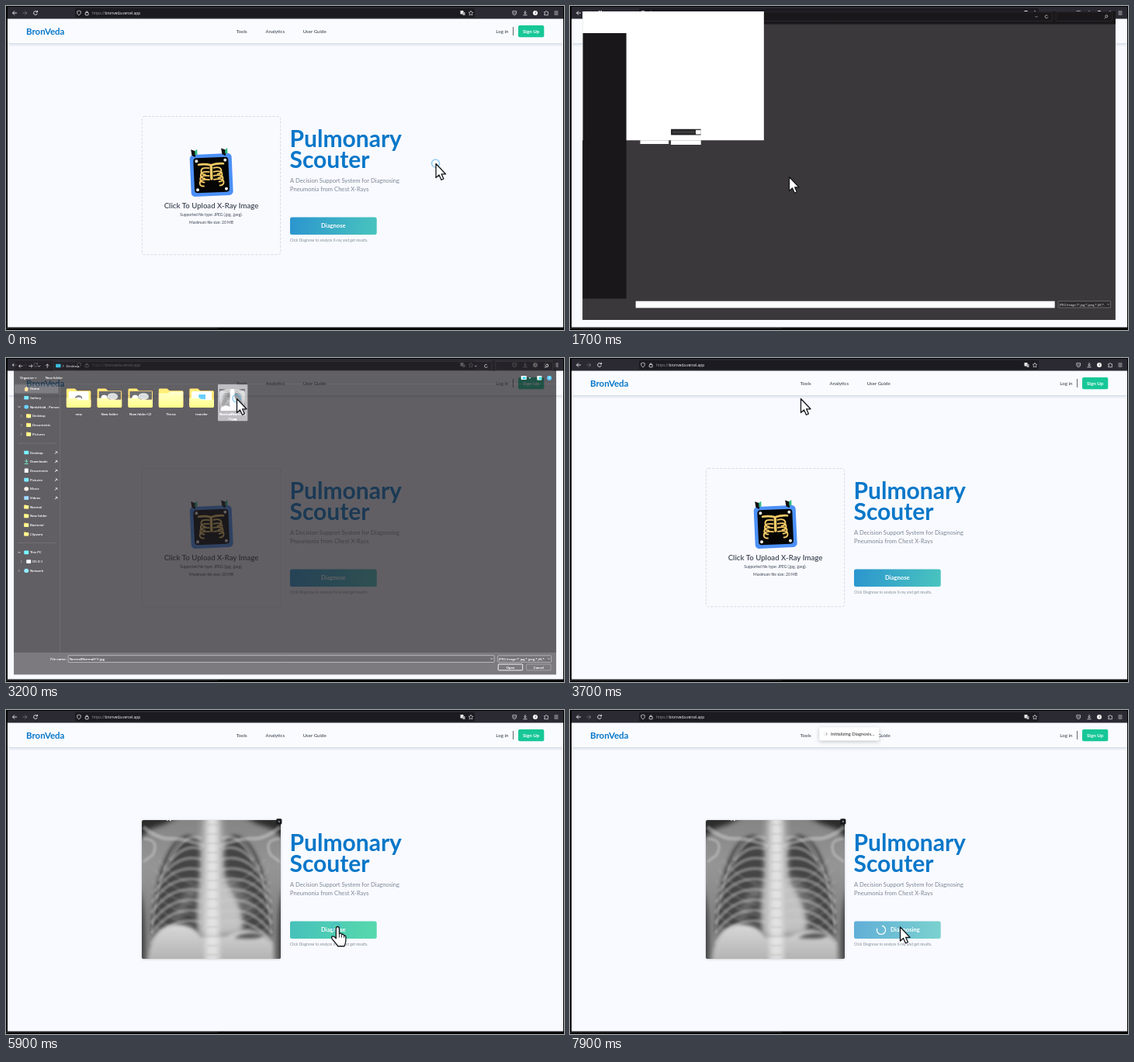
Recreate the animation shown at these times as an HTML page with a canvas. Size 719 by 418 pixels, loop 8 s.

```html
<!DOCTYPE html>
<html lang="en">
<head>
<meta charset="utf-8">
<title>Chest X-ray upload</title>
<style>
html, body { margin: 0; width: 100%; height: 100%; overflow: hidden; background: #000; }
canvas { display: block; width: 719px; height: 418px; }
</style>
</head>
<body>
<canvas id="stage" width="719" height="418"></canvas>
<script>
const LOOP = 8000, STEP = 100;
const PAGE_FONT = 'Lato, sans-serif', UI_FONT = '"Open Sans", "Noto Sans", sans-serif';
const stage = document.getElementById('stage').getContext('2d');
const layer = newCanvas(719, 418);
let ctx = stage;

const clamp = v => Math.min(1, Math.max(0, v));
const progress = (t, from, to) => clamp((t - from) / (to - from));
const ease = p => p * p * (3 - 2 * p);

function newCanvas(width, height) {
  return Object.assign(document.createElement('canvas'), { width, height }).getContext('2d');
}
function drawOn(target, draw) {
  const previous = ctx;
  ctx = target;
  draw();
  ctx = previous;
}
function rect(x, y, w, h, fill, radius = 0, stroke, lineWidth = 0.6) {
  ctx.beginPath();
  ctx.roundRect(x, y, w, h, radius);
  if (fill) { ctx.fillStyle = fill; ctx.fill(); }
  if (stroke) { ctx.strokeStyle = stroke; ctx.lineWidth = lineWidth; ctx.stroke(); }
}
function path(d, fill, stroke, lineWidth = 1) {
  const p = new Path2D(d);
  if (fill) { ctx.fillStyle = fill; ctx.fill(p); }
  if (stroke) { ctx.strokeStyle = stroke; ctx.lineWidth = lineWidth; ctx.stroke(p); }
}
function ellipse(x, y, rx, ry, fill) {
  ctx.beginPath();
  ctx.ellipse(x, y, rx, ry, 0, 0, Math.PI * 2);
  ctx.fillStyle = fill;
  ctx.fill();
}
function arc(x, y, r, from, to, stroke, lineWidth) {
  ctx.beginPath();
  ctx.arc(x, y, r, from, to);
  ctx.strokeStyle = stroke;
  ctx.lineWidth = lineWidth;
  ctx.stroke();
}
function text(s, x, y, size, color, { weight = 400, align = 'left', font = PAGE_FONT } = {}) {
  ctx.font = `${weight} ${size}px ${font}`;
  ctx.textAlign = align;
  ctx.fillStyle = color;
  ctx.fillText(s, x, y);
}
const uiText = (s, x, y, color = '#f2f2f2', align = 'left', size = 4.4) =>
  text(s, x, y, size, color, { align, font: UI_FONT });
function at(x, y, draw, sx = 1, sy = sx) {
  ctx.save();
  ctx.translate(x, y);
  ctx.scale(sx, sy);
  draw();
  ctx.restore();
}
function gradient(x0, y0, x1, y1, ...colors) {
  const g = ctx.createLinearGradient(x0, y0, x1, y1);
  colors.forEach((c, i) => g.addColorStop(i / (colors.length - 1), c));
  return g;
}
function withShadow(color, blur, dy, draw) {
  ctx.save();
  ctx.shadowColor = color;
  ctx.shadowBlur = blur;
  ctx.shadowOffsetY = dy;
  draw();
  ctx.restore();
}

// Soft-toned chest picture, painted once and reused for the preview and thumbnail
function paintXray() {
  rect(0, 0, 179, 179, gradient(0, 0, 0, 179, '#858585', '#959595', '#858585', '#8a8a8a'));
  ctx.filter = 'blur(3px)';
  path('M-5-5H48L30 5 10 12-5 26ZM184-5H131L149 5 169 12 184 26Z', '#2c2c2c');
  path('M-5 85Q6 110 4 184H-5ZM184 85Q173 110 175 184H184Z', '#404040');
  ctx.filter = 'blur(2.5px)';
  path('M54 21C31 28 13 85 12 148Q20 138 40 135 62 133 74 146C69 110 79 65 75 31Q65 15 54 21Z' +
       'M126 21C149 28 166 85 168 150Q152 138 128 142C134 118 112 92 108 76C103 53 105 36 108 28Q117 15 126 21Z', '#454545');
  ctx.filter = 'blur(1px)';
  for (const side of [-1, 1]) {
    at(90, 0, () => {
      for (let i = 0; i < 9; i++) {
        const y = 24 + i * 13.5, reach = 44 + 34 * Math.sin(Math.min(1.5, 0.3 + i * 0.25));
        path(`M12 ${y}Q${reach * 0.65} ${y - 10} ${reach} ${y + 28}`, null, 'rgba(205,205,205,.38)', 4.5);
        if (i > 1) path(`M${reach} ${y}Q${reach * 0.7} ${y + 25} 24 ${y + 31}`, null, 'rgba(200,200,200,.13)', 4);
      }
      path('M9 34Q35 23 52 24T88 9', null, 'rgba(220,220,220,.4)', 5);
      path('M88 24Q66 25 76 45L88 54', null, 'rgba(220,220,220,.35)', 4);
      path('M37 23Q66 45 77 145', null, 'rgba(225,225,225,.3)', 2);
    }, side, 1);
  }
  ctx.filter = 'blur(5px)';
  path('M79-5H102L105 75Q136 112 129 146L74 150Q69 105 77 75Z', 'rgba(205,205,205,.85)');
  path('M70 85Q55 100 45 130M110 75Q128 90 140 120', null, 'rgba(190,190,190,.4)', 9);
  ctx.filter = 'blur(2px)';
  path('M10 168Q18 138 42 135 66 135 76 151L108 150Q143 132 169 160V184H8Z',
    gradient(0, 135, 0, 179, '#d8d8d8', '#b4b4b4'));
  path('M119 152Q138 141 157 149Q151 155 119 152Z', '#555');
  ctx.filter = 'blur(3px)';
  path('M85-5H97L100 184H82Z', 'rgba(240,240,240,.7)');
  ctx.filter = 'blur(1px)';
  for (let y = 5; y < 175; y += 12) rect(84, y, 14, 2, 'rgba(150,150,150,.25)');
}
const xray = newCanvas(179, 179);
drawOn(xray, paintXray);

function browserBar() {
  rect(2, 1, 716, 15.5, '#2b2a33');
  rect(89, 3, 515, 12, '#1c1b22', 2);
  const ink = '#eee';
  path('M14 9H8.5M11 6.5L8.5 9 11 11.5', null, ink, 0.9);
  path('M21.5 9H27M24.5 6.5L27 9 24.5 11.5', null, '#777', 0.8);
  arc(38, 9, 2.4, 0.3, 5.5, ink, 0.9);
  path('M38.3 8.2H41V5.5Z', ink);
  path('M94 6L96.5 7Q96.5 11 94 12 91.5 11 91.5 7Z', null, ink, 0.7);
  rect(102.2, 8.5, 4, 3.3, null, 0.6, ink, 0.8);
  arc(104.2, 8.3, 1.3, Math.PI, 0, ink, 0.8);
  uiText('https://', 111, 11, '#98979f', 'left', 4.8);
  uiText('bronveda.vercel.app', 127.5, 11, '#fbfbfe', 'left', 4.8);
  rect(585.5, 6, 4, 4.5, ink, 0.5);
  rect(588.5, 8, 3, 4, '#aaa', 0.5);
  path('M599 6L599.9 8.1 602 8.3 600.4 9.8 600.9 12 599 10.8 597.1 12 597.6 9.8 596 8.3 598.1 8.1Z', null, ink, 0.6);
  path('M652.8 6.7H657.6V9Q657 11.7 655.2 11.7 653.4 11.7 652.8 9ZM654 8.4L655.2 9.6 656.4 8.4', null, ink, 0.7);
  path('M669 6V10M667.3 8.5L669 10.2 670.7 8.5M666.5 11.7H671.5', null, ink, 0.8);
  ellipse(682, 9, 3, 3, '#fff');
  path('M682.7 7V9.5H681.4', null, '#333', 0.6);
  path('M693.7 7.7H695Q696 5 697 7.7H698.4V11.7H693.7V10.4Q696 9.8 693.7 9Z', null, ink, 0.7);
  path('M706.5 7H711.5M706.5 9H711.5M706.5 11H711.5', null, ink, 0.7);
}

function ribcageIcon() {
  at(264.7, 218, () => {
    ctx.rotate(-0.045);
    ctx.lineCap = ctx.lineJoin = 'round';
    rect(-27, -27, 54, 54, '#4c90f7', 5);
    for (const x of [-21, 18]) {
      path(`M${x - 4}-34L${x + 3}-31 ${x + 1}-24 ${x - 3}-26Z`, '#101010');
      path(`M${x + 1}-32L${x + 4}-34V-27H${x + 1}Z`, '#2dbb83');
    }
    rect(-22.5, -22.5, 45, 45, '#050505', 4);
    for (const x of [-1, 1]) for (const y of [-1, 1]) ellipse(x * 18.5, y * 18.5, 2, 2, '#f1f1e8');
    const bone = '#f6cb66';
    path('M0-12V5', null, bone, 3.4);
    for (const side of [-1, 1]) at(0, 0, () => {
      path('M1-13Q8-15 16-14', null, bone, 2.6);
      for (let i = 0; i < 4; i++) {
        const y = -9 + i * 5, w = 13 + i * 0.8;
        path(`M3 ${y}Q${w} ${y - 2} ${w} ${y + 4}Q${w} ${y + 8} ${w - 5} ${y + 8}`, null, bone, 1.9);
      }
    }, side, 1);
  });
}

function uploadBox() {
  ctx.setLineDash([3, 2]);
  rect(175.4, 142.4, 178.2, 178.4, '#f9fafe', 3, '#cbd2dc', 0.8);
  ctx.setLineDash([]);
  ribcageIcon();
  const centered = { align: 'center', weight: 500 };
  text('Click To Upload X-Ray Image', 264.5, 261, 9.6, '#414956', { align: 'center', weight: 600 });
  text('Supported file type: JPEG (.jpg, .jpeg).', 264.5, 271.3, 4.9, '#4b5360', centered);
  text('Maximum file size: 20 MB', 264.5, 280.5, 5, '#4b5360', centered);
}

function preview() {
  withShadow('rgba(0,0,0,.2)', 3, 0.5, () => rect(175, 142, 179, 179, '#777', 2.5));
  ctx.save();
  ctx.beginPath();
  ctx.roundRect(175, 142, 179, 179, 2.5);
  ctx.clip();
  ctx.drawImage(xray.canvas, 175, 142);
  ctx.restore();
  rect(207, 141.5, 2, 1, '#fff');
  rect(211, 141.5, 1.5, 1.5, '#fff');
  rect(348.2, 140.3, 7.2, 7.2, '#16181c', 1.5);
  path('M350.6 142.7L353 145.1M353 142.7L350.6 145.1', null, '#bbb', 0.7);
}

function diagnoseButton(t, hover, busy) {
  const colors = busy ? ['#61aed7', '#7bd2cf'] : hover ? ['#46c1bb', '#56d9ac'] : ['#2b95cf', '#49c4be'];
  rect(366, 272.5, 111.7, 22.5, gradient(366, 272, 477, 295, ...colors), 2.5);
  const label = { weight: 700 };
  if (busy) {
    const a = t / 1000 * Math.PI * 2 - 0.77;
    arc(401, 283.8, 5.6, a, a + 4.9, '#fff', 1.3);
    text('Diagnosing', 413, 286.4, 7.6, '#fff', label);
  } else text('Diagnose', 406, 286.4, 7.6, '#fff', label);
}

function toast(t) {
  const p = ease(progress(t, 5900, 6200));
  if (!p) return;
  ctx.save();
  ctx.globalAlpha = p;
  at(359.7, 30.8, () => {
    withShadow('rgba(0,0,0,.22)', 5, 1.5, () => rect(-38.5, -8.6, 77, 17.2, '#fff', 2));
    arc(-30.7, 0, 2, 0, Math.PI * 2, '#e3e3e3', 0.7);
    const a = t / 1000 * Math.PI * 2;
    arc(-30.7, 0, 2, a, a + 1.6, '#666', 0.7);
    text('Initializing Diagnosis...', -23.7, 2, 5.8, '#363636', { weight: 500 });
  }, 0.85 + 0.15 * p);
  ctx.restore();
}

function page(t, hover) {
  rect(0, 0, 719, 418, '#000');
  rect(2, 16, 716, 398.5, '#f8faff');
  rect(0, 415.3, 273, 1, '#3b3b3b');
  rect(273, 415.3, 444, 1, '#1d1d1f');
  withShadow('rgba(40,60,90,.25)', 4, 1, () => rect(2, 16, 716, 32, '#f9fbff'));
  browserBar();
  text('BronVeda', 26, 37, 11.5, '#0877c9', { weight: 700 });
  for (const [s, x] of [['Tools', 296.7], ['Analytics', 334.6], ['User Guide', 382.7], ['Log in', 631.3]])
    text(s, x, 35.1, 6.1, '#3f4753', { weight: 500 });
  rect(653, 27, 0.8, 11, '#444');
  rect(660, 25, 33.3, 15.3, '#17c797', 2);
  text('Sign Up', 676.6, 35, 6.2, '#fff', { weight: 700, align: 'center' });

  t < 4500 ? uploadBox() : preview();
  text('Pulmonary', 365.5, 182.3, 30, '#0877c9', { weight: 700 });
  text('Scouter', 365.5, 208.6, 30, '#0877c9', { weight: 700 });
  text('A Decision Support System for Diagnosing', 366, 228, 7.6, '#7d8695');
  text('Pneumonia from Chest X-Rays', 366, 239.3, 7.6, '#7d8695');
  diagnoseButton(t, hover, t >= 6000);
  text('Click Diagnose to analyze X-ray and get results.', 366, 303.6, 4.85, '#858d9a');
  toast(t);
}

// Sidebar rows: centre y, label, indent, icon colour, icon shape
const GOLD = '#f7c948', BLUE = '#38a6e8';
const SIDEBAR = [
  [37, 'Home', 0, '#e8a35c', 'house'], [48.5, 'Gallery', 0, BLUE], [60.5, 'NimbHold - Persona', 0, '#2689dc', 'dot'],
  [72.5, 'Desktop', 3, GOLD], [84.5, 'Documents', 3, GOLD], [96.5, 'Pictures', 3, GOLD],
  [120.5, 'Desktop', 0, '#2fb4d4'], [132.3, 'Downloads', 0, '#35bd93', 'arrow'], [144.2, 'Documents', 0, '#b9c5d1', 'sheet'],
  [156.2, 'Pictures', 0, BLUE], [168.2, 'Music', 0, '#b7aaa0', 'dot'], [180.1, 'Videos', 0, '#5b94dc'],
  [192, 'Normal', 0, GOLD], [203.8, 'New folder', 0, GOLD], [215.7, 'Bacterial', 0, GOLD], [227.6, 'Clipvora', 0, GOLD],
  [251.6, 'This PC', 0, '#2fb4d4'], [263.6, 'OS (C:)', 3, '#aeb9c4'], [275.6, 'Network', 0, '#4ca7d8', 'dot'],
];
function sidebar() {
  rect(5, 31.3, 57.5, 11.5, '#373538', 1);
  rect(64, 31, 0.6, 352, '#302e31');
  for (const y of [108, 239]) rect(9, y, 51, 0.5, '#3a383b');
  ctx.save();
  ctx.beginPath();
  ctx.rect(4, 30, 59.5, 260);
  ctx.clip();
  for (const [y, label, indent, color, shape] of SIDEBAR) {
    const x = 17.5 + indent;
    if (shape === 'dot') ellipse(x + 3, y, 3, 2.6, color);
    else if (shape === 'house') path(`M${x} ${y}l3-3 3 3h-1v3h-4v-3z`, color);
    else if (shape === 'arrow') path(`M${x + 3} ${y - 3}v4m-2-2l2 2 2-2m-4.5 4h5`, null, color, 0.9);
    else if (shape === 'sheet') rect(x + 0.5, y - 2.8, 5, 5.6, color, 0.6);
    else {
      rect(x, y - 2.3, 6, 4.7, color, 0.7);
      if (color === GOLD) rect(x, y - 2.8, 2.8, 1.2, '#d99c24', 0.4);
    }
    uiText(label, 25.3 + indent, y + 1.6);
    if (y > 115 && y < 185) path(`M58 ${y + 1.7}l3-3m-2-.5l2.5 2.5`, null, '#ccc', 0.9);
  }
  for (const y of [60.5, 251.6]) path(`M9.5 ${y - 0.8}l1.6 1.6 1.6-1.6`, null, '#ddd', 0.6);
  for (const [x, y] of [[13, 72.5], [13, 84.5], [13, 96.5], [13, 263.6], [10, 275.6]])
    path(`M${x} ${y - 1.6}l1.6 1.6-1.6 1.6`, null, '#999', 0.5);
  ctx.restore();
}

function folder(x, label, content) {
  at(x, 0, () => {
    path('M-16 38Q-16 36.5-14.5 36.5H-5L-2 39.5H14.5Q16 39.5 16 41V60H-16Z', '#e2a52e');
    if (content) rect(-13, 40.5, 26, 14, '#f3f3f1');
    if (content === 'scan') { rect(-14, 40, 29, 14, '#262626'); ellipse(4, 47, 7, 4.5, '#999'); ellipse(-7, 49, 4, 4, '#eee'); }
    if (content === 'curve') { ellipse(0, 49, 5, 3.8, '#444'); ellipse(0, 51, 4, 3, '#eee'); }
    if (content === 'chart') rect(-4, 44, 9, 7, '#2888ca');
    const body = content ? 'M-16 49H-3L0 51H16V60Q16 61.5 14.5 61.5H-14.5Q-16 61.5-16 60Z'
                         : 'M-16 43H-4L-1 40.5H16V60Q16 61.5 14.5 61.5H-14.5Q-16 61.5-16 60Z';
    path(body, gradient(0, 40, 0, 62, '#ffe08a', '#f5c33f'));
  });
  uiText(label, x, 72, '#f4f4f4', 'center');
}

function typeCombo() {
  rect(638.5, 387, 70, 8.6, '#2b292c', 0.8, '#929092');
  uiText('JPEG Image (*.jpg;*.jpeg;*.jfif;*.', 640, 392.9, '#eee', 'left', 4.2);
  path('M704 390.5l1.4 1.4 1.4-1.4', null, '#ddd', 0.6);
}

function dialogTop() {
  rect(4, 0, 711, 17, '#19171a');
  rect(56.5, 0.8, 574, 12.2, '#19171a', 1, '#39373a');
  rect(635.5, 0.8, 75, 12.2, '#19171a', 1, '#39373a');
  path('M608 6.3l1.5 1.5 1.5-1.5', null, '#ddd', 0.6);
  arc(623, 7, 2, 0.3, 5.5, '#ddd', 0.7);
  arc(703, 6.4, 1.6, 0, 6.3, '#ddd', 0.7);
  path('M702 7.8l-1.8 1.8', null, '#ddd', 0.7);
}

function dialogSkeleton() {
  rect(4, 0, 711, 412, '#3a383a');
  dialogTop();
  rect(4, 0, 242, 172, '#fff');
  rect(4.5, 29, 58, 354.5, '#19171a');
  rect(81, 172, 38, 5, '#fff');
  rect(122, 157, 40, 8, '#39373a');
  rect(123, 158.4, 32, 5.4, '#3a383a', 0, '#111', 1);
  rect(155, 158.5, 7, 5.5, '#fff');
  rect(122, 172, 40, 6, '#fff');
  rect(75, 387, 559, 9, '#fff');
  typeCombo();
}

function dialogContent(selected) {
  rect(4, 0, 711, 412, '#19171a');
  dialogTop();
  path('M15.5 7H10.5M12.7 4.8L10.5 7 12.7 9.2M23.5 7H28.5M26.3 4.8L28.5 7 26.3 9.2M35.5 6.3l1.6 1.6 1.6-1.6M48 9.5V4.5M45.8 6.7L48 4.5 50.2 6.7', null, '#e8e8e8', 0.7);
  rect(59, 4.2, 6.5, 4.8, '#2fb4d4', 0.6);
  path('M68 5.5l1.4 1.4-1.4 1.4', null, '#ddd', 0.6);
  uiText('Desktop', 72.5, 8.5);
  uiText('Organize', 12, 24.2);
  path('M31.5 22l1.3 1.3 1.3-1.3', null, '#ddd', 0.6);
  uiText('New folder', 45.5, 24.2);
  rect(669, 20, 7, 5, '#e8e8e8', 0.5);
  rect(671, 21, 4, 3, '#2d9bd8');
  path('M679 22h3l-1.5 1.7z', '#ddd');
  rect(690, 20, 6, 5.5, '#e8e8e8', 0.5);
  rect(692.5, 20.8, 3, 4, '#35a7c4');
  ellipse(706, 22.6, 3, 3, '#1686d9');
  uiText('?', 706, 24.2, '#fff', 'center');
  rect(4, 30.3, 711, 0.5, '#2d2b2e');
  sidebar();
  folder(89, 'new', 'curve');
  folder(129.5, 'New folder', 'scan');
  folder(170, 'New folder (2)', 'scan');
  folder(210, 'Thesis');
  folder(250.3, 'transfer', 'chart');
  if (selected) rect(271.5, 31, 39, 48, '#777578', 1);
  ctx.drawImage(xray.canvas, 273.5, 37.5, 33.5, 28.5);
  uiText('Normal(Normal)(', 290.8, 72, '#f4f4f4', 'center');
  uiText('1).jpg', 290.8, 77.6, '#f4f4f4', 'center');

  rect(4, 383, 711, 29, '#343235');
  uiText('File name:', 73, 392.9, '#eee', 'right');
  rect(75.3, 386.8, 558.5, 9, '#29272a', 0.8, '#a09ea0');
  if (selected) uiText('Normal(Normal)(1).jpg', 77, 392.9);
  else rect(77, 388.4, 0.5, 5.8, '#ddd');
  path('M629 390.5l1.4 1.4 1.4-1.4', null, '#ddd', 0.6);
  typeCombo();
  rect(639, 398.3, 32, 8, '#343235', 1, '#e0e0e0', 0.7);
  uiText('Open', 655, 404, '#fff', 'center');
  rect(676, 398.3, 32, 8, '#343235', 1, '#777578');
  uiText('Cancel', 692, 404, '#fff', 'center');
}

function dialog(t) {
  if (t < 1600 || t >= 3300) return;
  const closing = t >= 3200;
  const scale = t < 1700 ? 0.93 : t < 1800 ? 0.966 : closing ? 0.983 : 1;
  const scaled = draw => at(359.5, 206, () => { ctx.translate(-359.5, -206); draw(); }, scale);
  drawOn(layer, () => {
    ctx.clearRect(0, 0, 719, 418);
    scaled(() => t < 1800 ? dialogSkeleton() : dialogContent(t >= 2900));
  });
  ctx.save();
  if (t < 1700) ctx.globalAlpha = 0.7;
  if (closing) {
    // The closing window glows over a dimmed page
    scaled(() => rect(4, 0, 711, 412, 'rgba(0,0,0,.71)'));
    ctx.globalCompositeOperation = 'lighter';
  }
  ctx.drawImage(layer.canvas, 0, 0);
  ctx.restore();
}

// Pointer stops: each move eases from the previous stop
const MOVES = [
  { from: 100, to: 800, x: 282, y: 220 },
  { from: 2000, to: 2700, x: 297, y: 52 },
  { from: 4900, to: 5700, x: 425, y: 279.5 },
];
function pointerAt(t) {
  let x = 553.5, y = 203;
  for (const m of MOVES) {
    const p = ease(progress(t, m.from, m.to));
    x += (m.x - x) * p;
    y += (m.y - y) * p;
  }
  return { x, y };
}
const inside = (p, x0, y0, x1, y1) => p.x >= x0 && p.x <= x1 && p.y >= y0 && p.y <= y1;

function clickRing(t, { x, y }) {
  const clicks = [-100, 1100, 2900, 3100, 5800];
  const start = clicks.find(c => t >= c && t < c + 200);
  if (start === undefined) return;
  const age = (t - start) / 200;
  arc(x, y, 4 + age * 2, 0, Math.PI * 2, `rgba(70,170,225,${0.85 - age * 0.6})`, 1.6);
}
function pointer({ x, y }, hand) {
  ctx.lineJoin = 'round';
  at(x, y, () => {
    if (hand) {
      ctx.scale(0.92, 1);
      path('M.3 3Q.3 0 2.5 0 4.8 0 4.8 3V9Q7.2 7.8 8.2 10 10.6 9 11.4 11.5 14 11 14 14V18Q13.5 22 12 25.2H3Q-1 20-5 16.2-7 13.5-4.6 12.4-2.5 12 .3 15.2Z', '#fff', '#16181c', 1.4);
      path('M4.8 9V14M8.2 10.2V14.2M11.4 11.7V14.6', null, '#16181c', 0.9);
    } else path('M.5.5V18.6L4.5 14.9 7.4 21.3 10.4 20 7.6 13.8H13Z', '#fff', '#15171b', 1.3);
  });
}

function render(now) {
  const t = Math.floor(now % LOOP / STEP) * STEP;
  const cursor = pointerAt(t);
  const overUpload = t < 1600 && inside(cursor, 175, 142, 354, 321);
  const overButton = t >= 4900 && t < 6000 && inside(cursor, 366, 272, 478, 295);
  page(t, overButton);
  dialog(t);
  clickRing(t, cursor);
  pointer(cursor, overUpload || overButton);
}

const start = performance.now();
function frame() {
  render(performance.now() - start);
  requestAnimationFrame(frame);
}
frame();
</script>
</body>
</html>
```
